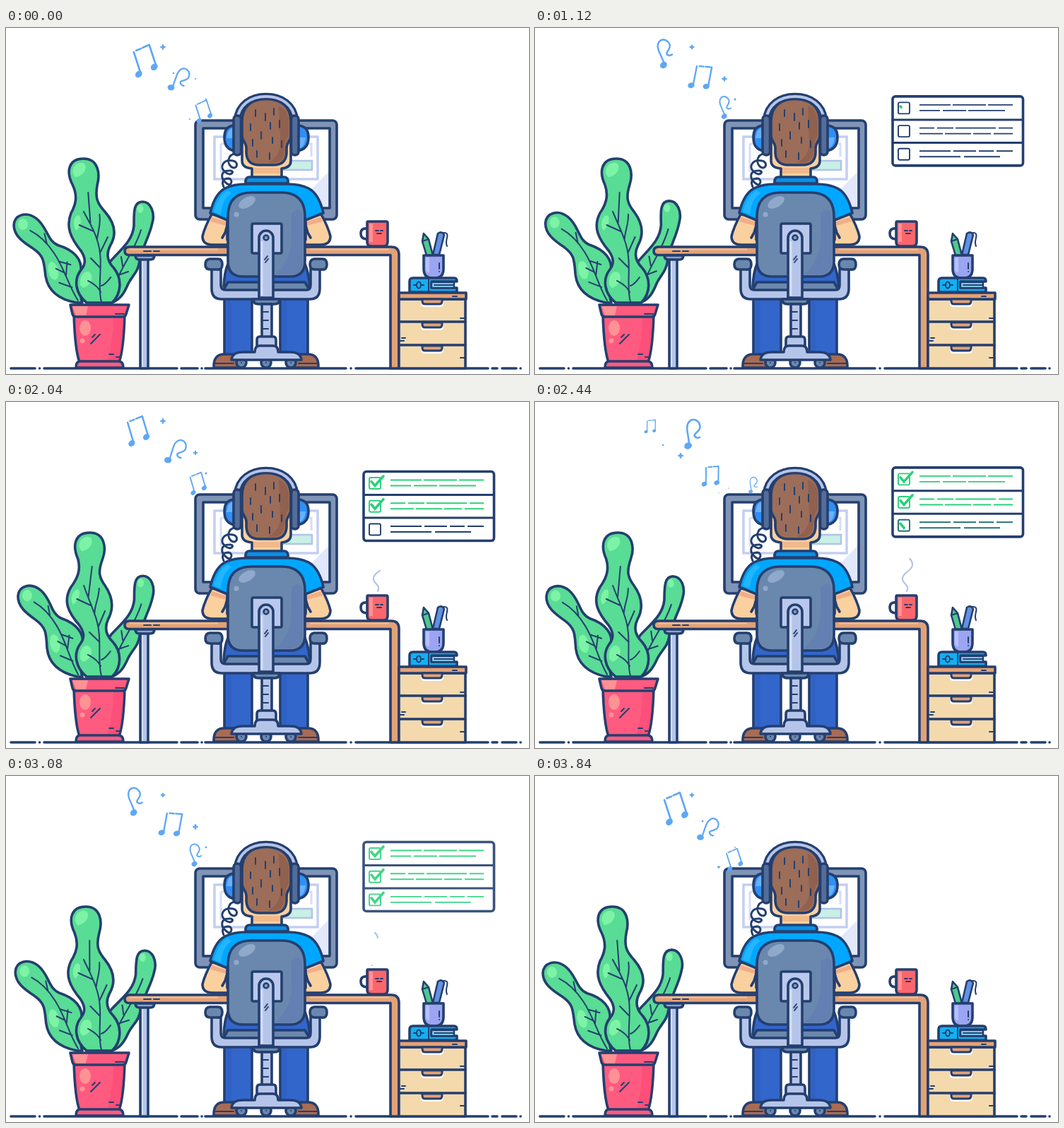
An HTML page that plays this animation: 740x490 px, repeating every 3.88 s.

```html
<!DOCTYPE html>
<html lang="en">
<head>
<meta charset="utf-8">
<title>Working with music</title>
<style>
  html, body { margin: 0; width: 100%; height: 100%; overflow: hidden; background: #fff; }
  svg { display: block; width: 740px; height: 490px; }
  .ink { stroke: #243f6f; stroke-width: 3.6; stroke-linecap: round; stroke-linejoin: round; }
  .thin { stroke: #243f6f; stroke-width: 2; stroke-linecap: round; stroke-linejoin: round; fill: none; }
  .line { fill: none; }
  .green { fill: #59dc95; }
  .glow { fill: #7df3a5; }
  .steel { fill: #b5c5e9; }
  .slate { fill: #6a88ad; }
  .skin { fill: #fbd09f; }
  .wood { fill: #e3a276; }
  .note { fill: none; stroke: #5fa7f6; stroke-width: 2.7; stroke-linecap: round; stroke-linejoin: round; }
  .spark { fill: #5fa7f6; }
</style>
</head>
<body>
<svg viewBox="0 0 740 490">
  <defs>
    <g id="beam" class="note">
      <path d="M-11 17V-15M-7-16L0-16.500M3-17L13-18V14"/>
      <ellipse cx="-14" cy="17" rx="4" ry="3" fill="#5fa7f6" transform="rotate(-25 -14 17)"/>
      <ellipse cx="10" cy="14" rx="4" ry="3" fill="#5fa7f6" transform="rotate(-25 10 14)"/>
    </g>
    <g id="single" class="note">
      <path d="M-1 16L-5-6C-8-26 12-27 14-12C14-4 5-3 6 2Q9 6 14 4"/>
      <ellipse cx="-3" cy="17" rx="4.500" ry="3.500" fill="#5fa7f6" transform="rotate(-25 -3 17)"/>
    </g>
    <path id="plus" class="spark" d="M-1.200-3.500h2.400v2.300h2.300v2.400h-2.300v2.300h-2.400v-2.300h-2.300v-2.400h2.300z"/>
    <circle id="dot" class="spark" r="1.400"/>
  </defs>

  <path class="ink line" d="M7 482H41M47.500 482h.1M54 482H242M248 482H271M277 482h.1M282 482H481M488 482h.1M495 482H682M688 482H695M702 482H722M728 482h.1"/>

  <!-- plant -->
  <g id="right">
    <path class="ink green" d="M136 389C140 370 132 350 148 330C162 314 179 302 181 280C181 262 180 246 193 246C205 246 211 262 207 276C203 296 191 314 189 330C187 346 179 350 173 362C167 376 162 384 150 389Z"/>
    <ellipse class="glow" cx="190" cy="256" rx="4.500" ry="6"/>
    <path class="thin" d="M153 372C157 345 181 319 191 286M165 337L163 324M174 322L186 316M159 350L173 345"/>
  </g>
  <g id="left">
    <path class="ink green" d="M100 389C76 384 60 372 57 350C55 330 56 322 41 311C26 301 14 292 14 277C15 262 32 257 46 268C62 281 60 300 76 307C98 314 110 328 107 345C105 360 104 378 108 389Z"/>
    <ellipse class="glow" cx="27" cy="276" rx="7" ry="8"/>
    <ellipse class="glow" cx="68" cy="343" rx="7" ry="13" transform="rotate(-12 68 343)"/>
    <path class="thin" d="M102 386C88 362 84 340 70 318C60 302 50 292 37 285M77 330L93 335M86 350L88 331M84 346L72 340M94 367L76 360M60 304L57 290"/>
  </g>
  <g id="stem">
    <path class="ink green" d="M114,389 C98,376 95,356 106,342 C113,333 111,325 105,316 C90,298 82,282 92,262 C100,250 104,238 98,222 C89,203 93,185 114,185 C135,185 138,206 133,222 C128,240 130,248 140,260 C154,278 154,294 146,308 C140,320 142,330 152,340 C164,354 164,376 150,389 Z"/>
    <path class="glow" d="M99,205 C98,190 115,187 117,195 C119,205 107,212 102,211 Z"/>
    <path class="glow" d="M95,283 C92,272 100,261 104,267 C107,274 102,284 97,287 Z"/>
    <path class="glow" d="M105,364 C103,350 112,341 119,347 C125,356 117,366 109,368 Z"/>
    <path class="thin" d="M135,388 C128,362 139,332 127,300 C123,287 116,274 110,260 M127,300 C128,286 133,278 132,264 M122,288 L102,279 M132,318 L142,296 M133,340 L119,326 M135,365 C141,363 144,358 148,353 M134,374 C129,364 121,361 116,358 M118,276 L119,233"/>
  </g>
  <path class="ink" fill="#ff5b80" d="M96 405C97 438 99 460 104 473H160C165 460 167 438 168 405Z"/>
  <path fill="#fa4573" d="M152 411H166C165 440 163 460 159 471H144Q152 440 152 411Z" opacity=".5"/>
  <path class="ink" fill="#ff5b80" d="M91 392H174L170 405Q169 409 165 409H99Q95 409 94 405Z"/>
  <path fill="#ff9294" d="M94 394H116L113 407H99Z"/>
  <ellipse cx="112" cy="425" rx="8" ry="11" fill="#ff9294"/><circle cx="108" cy="443" r="3.500" fill="#ff9294"/>
  <path class="ink" fill="#ff5b80" d="M105 472H159Q166 472 166 481H99Q99 472 105 472Z"/>
  <path class="thin" d="M120 447L133 434M122 438L126 434M146 462H152M156 466H160M155 405H167"/>

  <!-- desk -->
  <path class="ink steel" d="M190 326H201V482H190Z"/>
  <path d="M193 330V480" stroke="#d5def6" stroke-width="2"/>
  <path class="ink" fill="#8fa5cc" d="M183 322H210Q210 328 204 328H189Q183 328 183 322Z"/>
  <path class="ink wood" d="M174 310H545Q556 310 556 321V482H544V321.500H174Q168 321.500 168 316T174 310Z"/>
  <path class="line" d="M175 313.500H300M430 313.500H542" stroke="#f1bb91" stroke-width="2.500"/>
  <path class="thin" d="M195 316H205M209 316H217"/>

  <!-- monitor -->
  <rect class="ink" x="268" y="131" width="200" height="140" rx="6" fill="#7f94b6"/>
  <rect class="ink" x="279" y="142" width="179" height="113" fill="#fff" stroke-width="2.500"/>
  <path d="M456 204V253H408Z" fill="#e2e8fb"/>
  <rect x="295" y="154" width="146" height="60" fill="none" stroke="#c3cff0" stroke-width="3.500"/>
  <path d="M304 164H330M304 164V204M408 164H432V182" fill="none" stroke="#d5def6" stroke-width="3"/>
  <rect x="385" y="188" width="48" height="13" fill="#c9efe6" stroke="#aec3e8" stroke-width="2.500"/>

  <!-- lower body -->
  <path class="ink" fill="#3266cb" d="M309 376H348V466H309ZM388 376H427V466H388Z"/>
  <path d="M312 386H319V460H312ZM391 386H397V460H391Z" fill="#2f61c4"/>
  <path class="ink" fill="#3266cb" d="M314 334H423Q428 346 430 366H308Q309 346 314 334Z"/>
  <path class="ink" fill="#a96b53" d="M294 481Q293 462 309 462H332V481ZM442 481Q443 462 427 462H404V481Z"/>
  <path class="thin" d="M295 475H322M414 475H441"/>

  <!-- arms and shirt -->
  <path class="ink skin" d="M291 264Q281 282 278 295Q278 307 292 307H322V268ZM446 264Q456 282 459 295Q459 307 445 307H415V268Z"/>
  <path d="M292 268L313 275 311 280 289 274ZM445 268L424 275 426 280 448 274Z" fill="#f0ae88"/>
  <path class="ink line" d="M314 276L310 290M306 297L310 290M423 276L427 290M431 297L427 290"/>
  <path class="ink" fill="#00a7ff" d="M289 262Q295 235 310 227Q322 221 340 221H398Q416 221 428 227Q443 235 449 262L424 272V300H313V272Z"/>
  <path d="M294 260Q301 236 314 230L319 234Q306 242 304 264Z" fill="#22b6ff"/>

  <!-- head -->
  <path class="ink line" style="stroke-width:3" d="M329 179C316 175 311 189 318 196C326 203 331 190 321 188C308 185 301 197 310 204C319 212 325 201 316 202C303 202 303 213 312 220C319 226 322 214 315 213Q303 213 308 225"/>
  <path class="ink skin" d="M334 158V188Q334 198 348 199V215H390V199Q403 198 403 188V158Z"/>
  <path d="M350 198H388V206H350Z" fill="#f2b98c"/>
  <path class="ink" fill="#0890e6" d="M339 220Q338 211 345 211H393Q400 211 399 220Z"/>
  <path class="ink" fill="#2f8ff5" d="M324 138Q309 138 309 155T324 174ZM412 138Q428 138 428 155T412 174Z"/>
  <path d="M314 147Q318 141 322 142V156H312ZM424 155H414V170Q422 170 424 155Z" fill="#67b1ff"/>
  <path class="ink" fill="#9c6d59" d="M334 132C334 111 348 100 368 100S403 111 403 132V153C403 160 397 162 397 170V177Q396 194 379 194H358Q341 194 340 177V170C340 162 334 160 334 153Z"/>
  <path d="M386 110Q400 117 400 133V152Q394 160 394 172Q393 191 378 191H371Q390 180 388 158Z" fill="#90614f"/>
  <path class="thin" d="M353 116V125M367 121V131M379 114V123M346 136V145M374 134V143M387 131V141M361 147V157M349 158V167M377 155V163M390 160V169M355 174V183M373 177V186"/>
  <path id="band" class="ink line" style="stroke-width:10.5;stroke-linecap:butt" d="M327 130C329 109 346 97 368 97S407 109 409 130"/>
  <use href="#band" style="display:none"/>
  <path class="line" d="M327 130C329 109 346 97 368 97S407 109 409 130" stroke="#b5c5e9" stroke-width="4"/>
  <rect class="ink" x="322" y="124" width="10.500" height="56" rx="5" fill="#536d98"/>
  <rect class="ink" x="403.500" y="124" width="10.500" height="56" rx="5" fill="#536d98"/>

  <!-- chair -->
  <path class="ink slate" d="M314 360H423L430 372H307Z"/>
  <path class="ink steel" d="M291 341H304V364Q304 371 311 371H425Q431 371 431 364V341H444V369Q444 384 430 384H305Q291 384 291 369Z"/>
  <path class="ink slate" d="M288 327H300Q306 327 306 335T299 342H289Q282 342 282 335T288 327ZM436 327H448Q454 327 454 335T447 342H437Q430 342 430 335T436 327Z"/>
  <path class="ink slate" d="M314 267Q314 233 348 233H389Q423 233 423 267V330Q423 352 402 352H335Q314 352 314 330Z"/>
  <path d="M404 262Q420 250 420 270V329Q420 349 402 349H380Q404 330 404 295Z" fill="#6480b2"/>
  <ellipse cx="341" cy="247" rx="13" ry="7" fill="#8fa9cb" transform="rotate(-30 341 247)"/>
  <circle cx="326" cy="264" r="3.500" fill="#8fa9cb"/>
  <rect class="ink" x="348" y="277" width="42" height="42" rx="2" fill="#bac8ed"/>
  <path class="ink steel" d="M358 382V297A10 10 0 0 1 378 297V382Z"/>
  <path d="M362 302V379" stroke="#d5def6" stroke-width="3"/>
  <circle class="ink" cx="368" cy="297" r="3.500" fill="#8399c0" style="stroke-width:2.500"/>
  <path class="thin" d="M366 328L370 323M367 332L371 327"/>
  <path class="ink slate" d="M350 384H387Q387 391 380 391H357Q350 391 350 384Z"/>
  <path class="ink steel" d="M362 391H376V438H362Z"/>
  <path class="thin" d="M362 402H371M362 414H371M362 426H371"/>
  <path class="ink steel" d="M359 437H378Q382 437 382 442V452H355V442Q355 437 359 437Z"/>
  <g class="ink slate">
    <circle cx="333" cy="474" r="7"/><circle cx="368" cy="474" r="7"/><circle cx="403" cy="474" r="7"/>
  </g>
  <path class="ink steel" d="M319 470Q320 459 335 459H352Q352 450 359 450H378Q385 450 385 459H402Q417 459 418 470Z"/>
  <path class="thin" d="M333 474h.1M368 474h.1M403 474h.1"/>

  <!-- mug, pens, books, drawers -->
  <path class="ink line" d="M511 284Q502 283 502 291T511 299"/>
  <path class="ink" fill="#fb666c" d="M512 274H538Q540 274 540 276V303Q540 309 534 309H517Q511 309 511 303V276Q511 274 512 274Z"/>
  <path d="M514 277H519V303H514Z" fill="#ff9294"/>
  <path class="thin" d="M523 287H527M530 287H533M525 291H531"/>
  <path class="ink" style="stroke-width:2.600" fill="#4fc98c" d="M595 322L589 302L591 291L598 299L604 322Z"/>
  <path class="thin" d="M589 302L598 299"/>
  <path class="ink" style="stroke-width:2.600" fill="#6292e3" d="M604 321L611 291Q617 287 620 293L613 321Z"/>
  <path class="thin" d="M619 290Q626 289 624 297T624 309"/>
  <path class="ink" fill="#9ba5f2" d="M591 322H619V341Q619 354 607 354H603Q591 354 591 341Z"/>
  <path d="M594 325H599V346Q594 346 594 340Z" fill="#b7c0fb"/>
  <path class="thin" d="M613 333V341M613 345h.1"/>
  <path class="ink" fill="#12b0f2" d="M576 354H634Q638 354 638 359H602V368H638V374H571V359Q571 354 576 354Z"/>
  <path class="ink" style="stroke-width:2.500" fill="#8fd8f8" d="M602 360H634V368H602Z"/>
  <path class="thin" d="M598 356V373M606 364H634M577 364H580M588 364H591"/>
  <ellipse class="thin" cx="584" cy="364" rx="3" ry="4.500"/>
  <path class="ink" fill="#f4d9ad" d="M556 384H650V482H556Z"/>
  <path class="ink wood" d="M556 375H651V384H556Z"/>
  <path class="ink line" d="M557 416H650M557 449H650"/>
  <g id="pulls"></g>
  <path class="thin" d="M643 411H648M557 443H563M560 439H565M632 380H638M643 467H648"/>

  <path id="steam" pathLength="100" fill="none" stroke="#b3c3e7" stroke-width="2.200" stroke-linecap="round" d="M526 268C531 258 518 257 520 249C522 240 533 240 534 231Q534 225 530 222"/>
  <g id="panel">
    <rect class="ink" x="506" y="0" width="184.500" height="98" rx="4" fill="#fff"/>
    <path class="ink line" style="stroke-width:3" d="M506 33H690M506 65.500H690"/>
  </g>
  <g id="music"></g>
</svg>

<script>
const LOOP = 3880, BEAT = LOOP / 4, TAU = 2 * Math.PI;
const $ = id => document.getElementById(id);

function add(parent, tag, attrs) {
  const el = document.createElementNS('http://www.w3.org/2000/svg', tag);
  for (const k in attrs) el.setAttribute(k, attrs[k]);
  return parent.appendChild(el);
}
const set = (el, name, value) => el.setAttribute(name, value);
const clamp = v => Math.max(0, Math.min(1, v));
const mod = (a, n) => ((a % n) + n) % n;

// Interpolates rows of [time, ...values].
function track(rows, t, ease = f => f) {
  let i = 1;
  while (i < rows.length - 1 && rows[i][0] < t) i++;
  const a = rows[i - 1], b = rows[i];
  const f = ease(clamp((t - a[0]) / (b[0] - a[0])));
  return a.slice(1).map((v, k) => v + (b[k + 1] - v) * f);
}
const smooth = f => f * f * (3 - 2 * f);

for (const y of [384, 417, 450]) {
  const d = `M589 ${y}H617V${y + 3}Q617 ${y + 7} 613 ${y + 7}H593Q589 ${y + 7} 589 ${y + 3}Z`;
  add($('pulls'), 'path', { d: `M587 ${y + 2}H619V${y + 6}Q619 ${y + 11} 614 ${y + 11}H592Q587 ${y + 11} 587 ${y + 6}Z`, fill: '#fff' });
  add($('pulls'), 'path', { class: 'ink wood', d, style: 'stroke-width:3' });
}

// Checklist
const rowText = [
  'M544 12H588M591 12H638M641 12H676M544 20H573M577 20H610M613 20H665',
  'M544 12H565M569 12H592M595 12H652M656 12H676M544 20H577M580 20H617M620 20H645M649 20H676',
  'M544 12H588M592 12H624M628 12H649M653 12H676M544 20H602M607 20H658'
];
const tasks = rowText.map((d, i) => {
  const g = add($('panel'), 'g', { transform: `translate(0 ${i * 32.7})` });
  const tint = add(g, 'g', { fill: 'none', 'stroke-width': 1.9 });
  add(tint, 'rect', { x: 514, y: 8.5, width: 16, height: 16, rx: 2 });
  add(tint, 'path', { d });
  const tick = add(g, 'path', { d: 'M517 14L522 20L534 6.500', pathLength: 100, fill: 'none', stroke: '#2bd07b', 'stroke-width': 3.6, 'stroke-dasharray': '100 200', 'stroke-linecap': 'round' });
  return { tint, tick, start: 1100 + i * 620 };
});
const panelY = [[480, 108], [640, 104], [1250, 96], [1750, 101], [2600, 92], [3080, 93.5], [3450, 97]];
const navy = [36, 63, 111], leaf = [43, 208, 123];

function drawPanel(t) {
  const shown = clamp((t - 480) / 220) * clamp((3420 - t) / 380);
  set($('panel'), 'opacity', shown);
  set($('panel'), 'transform', `translate(0 ${track(panelY, t, smooth)[0]})`);
  for (const { tint, tick, start } of tasks) {
    const f = clamp((t - start - 20) / 240);
    set(tint, 'stroke', `rgb(${navy.map((v, k) => Math.round(v + (leaf[k] - v) * f))})`);
    const drawn = 100 * clamp((t - start) / 320);
    set(tick, 'stroke-dashoffset', 100 - drawn);
    set(tick, 'opacity', t > start ? 1 : 0);
  }
}

function drawSteam(t) {
  const head = 100 * smooth(clamp((t - 1600) / 740));
  const tail = 100 * smooth(clamp((t - 2450) / 840));
  set($('steam'), 'stroke-dasharray', `0 ${tail} ${Math.max(0, head - tail)} 300`);
  set($('steam'), 'opacity', head > tail ? 1 : 0);
  set($('steam'), 'transform', `translate(${-8 * clamp((t - 2450) / 630)} 0)`);
}

// Plant: side leaves turn, the middle one bends.
const bends = [...$('stem').children].map(el => [el, el.getAttribute('d')]);
const bendRows = [[215, 4.5], [285, -2.3], [360, 0]];
function drawPlant(t) {
  const a = TAU * t / LOOP, k = -Math.cos(a);
  set($('left'), 'transform', `rotate(${1.5 * k} 105 390)`);
  set($('right'), 'transform', `rotate(${-1.4 * Math.sin(a)} 142 390)`);
  for (const [el, d] of bends)
    set(el, 'd', d.replace(/([\d.]+),([\d.]+)/g, (_, x, y) => `${(+x + k * track(bendRows, +y)[0]).toFixed(2)},${y}`));
}

// Music: age, x, y, scale, opacity
const flight = [
  [0, 315, 119, .35, 0], [110, 307, 118, .52, .9], [280, 297, 119, .6, 1], [580, 279, 117, .7, 1],
  [730, 267, 113, .7, 1], [1080, 250, 104, .73, 1], [1230, 246, 95, .78, 1], [1550, 243, 73, .85, 1],
  [1700, 236, 69, .88, 1], [2050, 220, 46, .95, 1], [2205, 213, 42, 1, 1], [2520, 196, 45, 1, 1],
  [2670, 181, 37, .9, 1], [3020, 164, 34, .48, 1], [3170, 158, 26, .32, 1], [3310, 154, 22, .2, 0]
];
const notes = ['single', 'beam', 'single', 'beam'].map(name => add($('music'), 'use', { href: '#' + name }));
// shape, x, y, time of full size within a beat
const sparks = [
  ['plus', 222, 27, 60], ['plus', 268, 72, 220], ['plus', 206, 76, 540], ['plus', 260, 129, 750],
  ['dot', 237, 64, 860], ['dot', 181, 61, 590], ['dot', 274, 122, 690], ['dot', 283, 101, 130]
].map(([name, x, y, peak]) => ({ el: add($('music'), 'use', { href: '#' + name }), x, y, peak }));

function drawMusic(t) {
  notes.forEach((el, i) => {
    const age = mod(t - 2330 + i * BEAT, LOOP);
    const [x, y, s, o] = track(flight, age);
    const swing = Math.cos(TAU * (age - 540) / (2 * BEAT));
    const turn = i % 2 ? -2 - 16 * swing : 6 - 24 * swing;
    set(el, 'transform', `translate(${x} ${y}) rotate(${turn}) scale(${s})`);
    set(el, 'opacity', o);
  });
  for (const { el, x, y, peak } of sparks) {
    const s = Math.max(0, .25 + .85 * Math.cos(TAU * (t - peak) / BEAT));
    set(el, 'transform', `translate(${x} ${y}) scale(${s})`);
  }
}

function frame() {
  const t = performance.now() % LOOP;
  drawPlant(t);
  drawPanel(t);
  drawSteam(t);
  drawMusic(t);
  requestAnimationFrame(frame);
}
frame();
</script>
</body>
</html>
```
